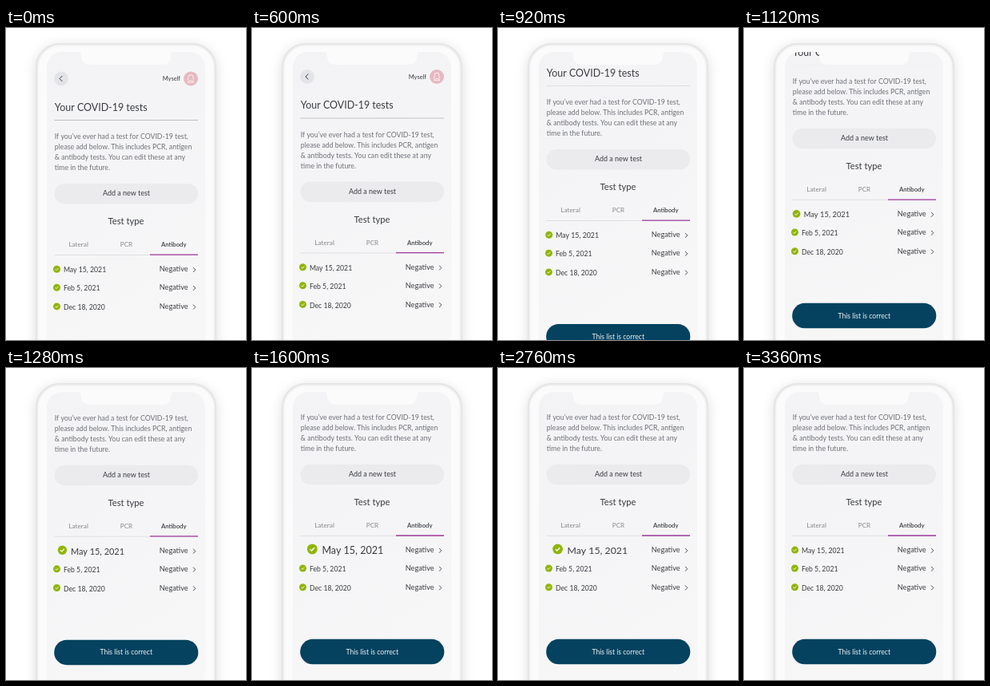
An HTML page with a canvas that plays this animation: 300 px wide and 391 px high, repeating every 3400 ms.

```html
<!DOCTYPE html>
<html lang="en">
<head>
<meta charset="utf-8">
<title>Test list</title>
<style>
html, body { margin: 0; width: 100%; height: 100%; overflow: hidden; background: #fff; }
canvas { display: block; width: 300px; height: 391px; }
</style>
</head>
<body>
<canvas id="stage"></canvas>
<script>
const W = 300, H = 391, LOOP = 3400, SCROLL = 74.2;
const canvas = document.getElementById('stage');
const ctx = canvas.getContext('2d');
const dpr = window.devicePixelRatio || 1;
canvas.width = W * dpr;
canvas.height = H * dpr;

const DARK = '#3b3d42', GREY = '#707278', GREEN = '#91b508';

// Smooth S-curve centred on the given time.
const ease = (t, centre) => 1 / (1 + Math.exp(-0.0115 * (t - centre)));

function text(str, x, y, size, color, align = 'left', weight = 400) {
  ctx.font = `${weight} ${size}px Lato, "Open Sans", sans-serif`;
  ctx.textAlign = align;
  ctx.fillStyle = color;
  ctx.fillText(str, x, y);
}

function roundRect(x, y, w, h, r, fill) {
  ctx.beginPath();
  ctx.roundRect(x, y, w, h, r);
  ctx.fillStyle = fill;
  ctx.fill();
}

function disc(x, y, r, fill) {
  ctx.beginPath();
  ctx.arc(x, y, r, 0, Math.PI * 2);
  ctx.fillStyle = fill;
  ctx.fill();
}

function line(points, color, width) {
  ctx.beginPath();
  points.forEach(([x, y]) => ctx.lineTo(x, y));
  ctx.strokeStyle = color;
  ctx.lineWidth = width;
  ctx.stroke();
}

function phoneBody() {
  ctx.save();
  ctx.shadowColor = 'rgba(0,0,0,0.13)';
  ctx.shadowBlur = 16 * dpr;
  ctx.shadowOffsetY = 3 * dpr;
  roundRect(37, 19, 226, 460, 30, '#e3e3e5');
  ctx.restore();
  // Bevelled edge, lighter towards the inside.
  ['#ececee', '#f5f5f6', '#fbfbfb'].forEach((shade, i) => {
    const inset = 1.3 * (i + 1);
    roundRect(37 + inset, 19 + inset, 226 - 2 * inset, 460, 30 - inset, shade);
  });
}

function notch() {
  ctx.beginPath();
  ctx.moveTo(89, 29);
  ctx.quadraticCurveTo(94, 30, 94, 35);
  ctx.quadraticCurveTo(94, 46, 105, 46);
  ctx.lineTo(195, 46);
  ctx.quadraticCurveTo(206, 46, 206, 35);
  ctx.quadraticCurveTo(206, 30, 211, 29);
  ctx.closePath();
  ctx.fillStyle = '#fbfbfb';
  ctx.fill();
}

function avatar(x, y) {
  disc(x, y, 9, '#e7b8c0');
  ctx.strokeStyle = '#fff';
  ctx.lineWidth = 0.8;
  ctx.beginPath();
  ctx.moveTo(x - 3.6, y + 2);
  ctx.quadraticCurveTo(x - 2.9, y, x - 2.9, y - 2);
  ctx.arc(x, y - 2, 2.9, Math.PI, 0);
  ctx.quadraticCurveTo(x + 2.9, y, x + 3.6, y + 2);
  ctx.moveTo(x - 3.6, y + 4.6);
  ctx.quadraticCurveTo(x - 3.4, y + 2.2, x, y + 2.2);
  ctx.quadraticCurveTo(x + 3.4, y + 2.2, x + 3.6, y + 4.6);
  ctx.closePath();
  ctx.stroke();
}

function header() {
  disc(69, 63.5, 9, '#e3e4e8');
  line([[70.4, 60], [67, 63.5], [70.4, 67]], DARK, 1);
  text('Myself', 218, 66.2, 7.5, DARK, 'right');
  avatar(231, 63.5);
}

function dateLabel(label, y, grow = 0) {
  const scale = 1 + 0.45 * grow;
  ctx.save();
  ctx.translate(63.5 + 12 * grow, y - 1.2 * grow);
  ctx.scale(scale, scale);
  disc(0, 0, 4.5, GREEN);
  line([[-1.9, 0.1], [-0.6, 1.4], [1.9, -1.2]], '#fff', 0.9);
  text(label, 8.4, 4.2, 8.7, DARK);
  ctx.restore();
}

function row(label, y, grow) {
  dateLabel(label, y, grow);
  text('Negative', 191.8, y + 3.2, 9.1, DARK);
  line([[234, y - 2.2], [236.8, y + 0.7], [234, y + 3.6]], DARK, 0.9);
}

function content(progress, grow) {
  header();
  text('Your COVID-19 tests', 60.8, 103.8, 12.45, DARK);
  ctx.globalAlpha = 1 - progress;
  line([[60.5, 115.5], [240, 115.5]], '#bfc0c5', 1);
  ctx.globalAlpha = 1;

  ['If you’ve ever had a test for COVID-19 test,',
   'please add below. This includes PCR, antigen',
   '& antibody tests. You can edit these at any',
   'time in the future.'
  ].forEach((str, i) => text(str, 60.8, 139.2 + 13 * i, 8.75, GREY));

  roundRect(60.5, 195, 179.5, 25.5, 12.75, '#ebebee');
  text('Add a new test', 150.5, 210.4, 8.95, DARK, 'center');
  text('Test type', 150, 246, 11.2, DARK, 'center');

  text('Lateral', 90.5, 274.2, 8.3, '#85878c', 'center');
  text('PCR', 150.5, 274.2, 8.1, '#85878c', 'center');
  text('Antibody', 209.7, 274.2, 7.7, DARK, 'center', 600);
  line([[60.5, 284.5], [240, 284.5]], '#d9dade', 0.8);
  line([[180, 284.2], [240, 284.2]], '#a23a9c', 1.3);

  row('May 15, 2021', 302.3, grow);
  row('Feb 5, 2021', 325.2);
  row('Dec 18, 2020', 348.9);

  roundRect(60.2, 414, 180.1, 31.5, 15.75, '#04425f');
  text('This list is correct', 150.2, 432.8, 8.6, '#eef3f6', 'center');
}

function draw(t) {
  const progress = ease(t, 893);
  const grow = ease(t, 1255) * (1 - ease(t, 2983));

  ctx.setTransform(dpr, 0, 0, dpr, 0, 0);
  ctx.fillStyle = '#fff';
  ctx.fillRect(0, 0, W, H);
  phoneBody();

  ctx.save();
  ctx.beginPath();
  ctx.roundRect(51, 30, 198, 420, 19);
  ctx.clip();
  const shade = ctx.createLinearGradient(51, 30, 249, 391);
  shade.addColorStop(0, '#f3f3f5');
  shade.addColorStop(1, '#f7f7f8');
  ctx.fillStyle = shade;
  ctx.fillRect(51, 30, 198, 420);
  ctx.translate(0, -SCROLL * progress);
  content(progress, grow);
  ctx.restore();

  notch();
}

const start = performance.now();
function tick() {
  draw((performance.now() - start) % LOOP);
  requestAnimationFrame(tick);
}
tick();
</script>
</body>
</html>
```
